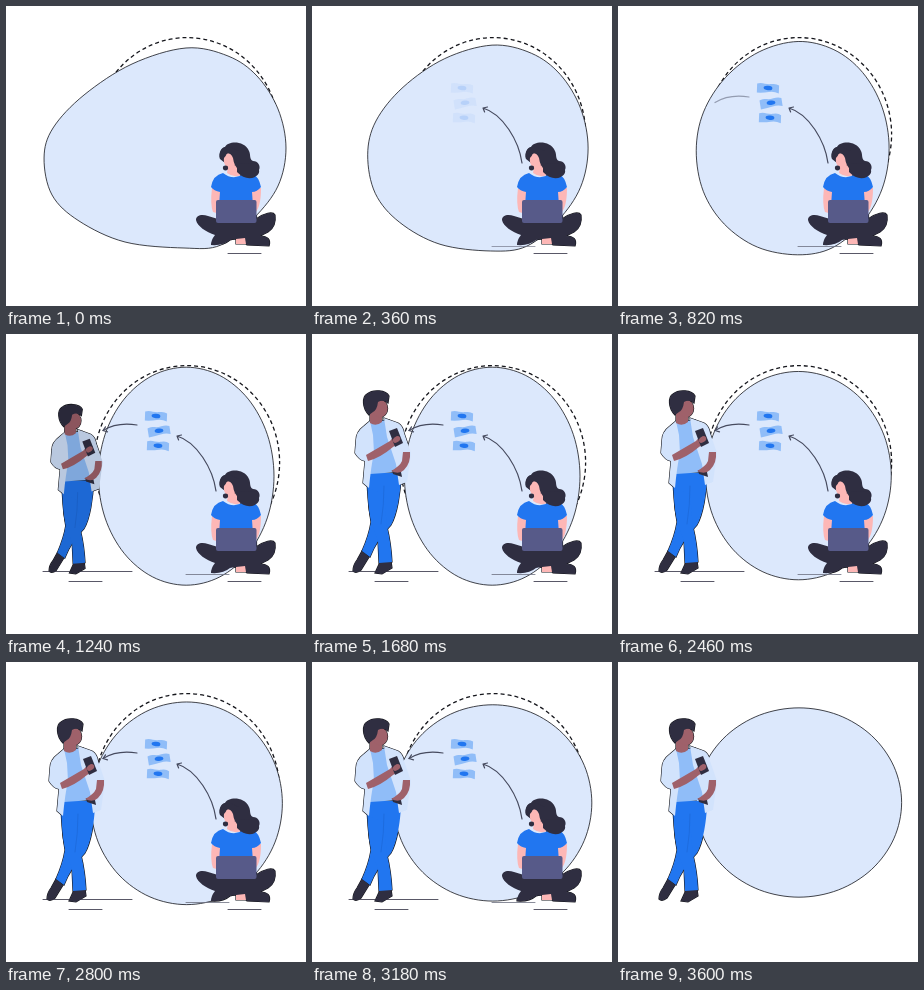
An HTML page with a canvas that plays this animation: 300 px wide and 300 px high, repeating every 3620 ms.

```html
<!DOCTYPE html>
<html lang="en">
<head>
<meta charset="utf-8">
<title>Sending money</title>
<style>
  html, body { margin: 0; width: 100%; height: 100%; overflow: hidden; background: #fff; }
  canvas { display: block; width: 300px; height: 300px; }
</style>
</head>
<body>
<canvas id="stage"></canvas>
<script>
const LOOP = 3620;
const INK = '#2f2e41', LINE = '#464a5e', EDGE = '#15161c', BLUE = '#2176f0', SKY = '#90bdf8';
const SKIN = '#fdb7b6', BROWN = '#9f616a', COAT = '#d2e3fc', FIELD = '#dce8fc';

const canvas = document.getElementById('stage');
const ctx = canvas.getContext('2d');
const ratio = window.devicePixelRatio || 1;
canvas.width = canvas.height = 300 * ratio;

let rimOnly = false; // when set, shapes draw only their dark rim

const clamp = v => Math.max(0, Math.min(1, v));
const progress = (t, from, to) => clamp((t - from) / (to - from));

function paint(color, path) {
  if (rimOnly) {
    ctx.strokeStyle = EDGE;
    ctx.lineWidth = 1.2;
    ctx.stroke(path);
  } else {
    ctx.fillStyle = color;
    ctx.fill(path);
  }
}

const fill = (color, d) => paint(color, new Path2D(d));

function oval(color, x, y, rx, ry, turn = 0) {
  const path = new Path2D();
  path.ellipse(x, y, rx, ry, turn, 0, Math.PI * 2);
  paint(color, path);
}

function stroke(color, width, d) {
  ctx.strokeStyle = color;
  ctx.lineWidth = width;
  ctx.lineCap = ctx.lineJoin = 'round';
  ctx.stroke(new Path2D(d));
}

function layer(alpha, draw) {
  if (alpha <= 0) return;
  ctx.save();
  ctx.globalAlpha = alpha;
  draw();
  ctx.restore();
}

function rim(draw) {
  rimOnly = true;
  draw();
  rimOnly = false;
}

// Field outlines, all clockwise from the rightmost point
const pebble = [
  [280, 142], [272, 180], [248, 212], [215, 239], [178, 242], [119, 236], [73, 215], [46, 189],
  [38, 152], [47, 122], [78, 89], [126, 58], [180, 42], [222, 50], [251, 70], [272, 103]
];
const ring = (cx, cy, rx, ry) => pebble.map((_, i) => {
  const a = i * Math.PI * 2 / pebble.length;
  return [cx + rx * Math.cos(a), cy + ry * Math.sin(a)];
});
const tall = ring(180.2, 142.2, 87.8, 109);
const wide = ring(181, 140.5, 102.8, 94.5);
const mix = (a, b, u) => a.map(([x, y], i) => [x + (b[i][0] - x) * u, y + (b[i][1] - y) * u]);

function drawField(t) {
  const pts = t < 1110
    ? mix(pebble, tall, t / 1110)
    : mix(tall, wide, progress(t, 1880, LOOP));
  const at = i => pts[(i + pts.length) % pts.length];
  ctx.beginPath();
  ctx.moveTo(...pts[0]);
  pts.forEach((p, i) => {
    const before = at(i - 1), next = at(i + 1), after = at(i + 2);
    ctx.bezierCurveTo(
      p[0] + (next[0] - before[0]) / 6, p[1] + (next[1] - before[1]) / 6,
      next[0] - (after[0] - p[0]) / 6, next[1] - (after[1] - p[1]) / 6,
      next[0], next[1]);
  });
  ctx.closePath();
  ctx.fillStyle = FIELD;
  ctx.fill();
  ctx.strokeStyle = EDGE;
  ctx.lineWidth = 0.8;
  ctx.stroke();
}

function drawDashes(t) {
  ctx.strokeStyle = EDGE;
  ctx.lineWidth = 1.3;
  ctx.lineCap = 'butt';
  ctx.setLineDash([4, 3]);
  ctx.lineDashOffset = -t / LOOP * 14;
  ctx.beginPath();
  ctx.ellipse(181, 128.4, 92.6, 96.8, 0, 0, Math.PI * 2);
  ctx.stroke();
}

function drawNote(x, y, turn) {
  ctx.save();
  ctx.translate(x, y);
  ctx.rotate(turn);
  fill(SKY, 'M-11-4C-6-6-2-3 3-4Q8-5 11-3L11 5Q6 3 1 4T-11 5Z');
  oval(BLUE, 0, 0, 4.4, 2.2, 0.05);
  ctx.restore();
}

function drawMoney() {
  drawNote(150, 82, 0.04);
  drawNote(153, 96.8, -0.16);
  drawNote(152, 111.7, 0.04);
}

const drawRightArrow = () =>
  stroke(LINE, 1.2, 'M210 157C207 135 191 108 171 102M175.5 101L171 102L172.6 106');

function drawWoman() {
  // Hair behind, then neck, arms and shirt
  fill(INK, 'M214 153C212 146 216 141 219 141C222 135 238 134 243 145C245 149 243 153 247 155C252 155 255 160 253 164C254 168 250 170 249 171C243 175 234 171 229 165Z');
  fill(SKIN, 'M222 160L231 159Q231 167 236 168Q229 173 221 167Z');
  fill(SKIN, 'M206 182Q204 198 207 206L214 208L215 183ZM244 182L255 182Q255 201 249 207L243 204Z');
  fill(BLUE, 'M217 167Q227 175 238 168L247 168Q253 171 255 181Q251 186 246 186L247 200L213 200L214 186Q208 185 205 181Q207 169 217 167Z');
  fill(INK, 'M231 158L250 157C255 160 252 167 249 171Q240 175 231 166Z');
  oval(SKIN, 223.5, 155, 5.6, 7.8, -0.25);
  fill(INK, 'M214 153C212 145 218 139 224 141L233 145L233 164Q228 160 227 152Q225 147 221 147Q219 153 214 153Z');
  oval(INK, 219.5, 162, 2.6, 2.4);

  // Crossed legs and laptop
  fill(INK, 'M190 214C190 209 196 208 202 210L212 213L250 213C258 207 267 205 269 209C270 216 268 222 262 226L254 230C262 230 265 234 263 240L241 239C238 234 230 232 224 234Q217 240 205 239Q205 234 209 229C200 226 191 220 190 214Z');
  fill(SKIN, 'M230 233L239 232L240 238L230 238Z');
  const laptop = new Path2D();
  laptop.roundRect(210, 194, 40.5, 23, 2);
  paint('#575a89', laptop);
}

function drawMan() {
  // Shoes and crossed legs
  fill(INK, 'M50 217L57 223L49 236Q44 240 41 237Q41 231 45 226ZM68 228L79 227L80 234L70 240L63 239Z');
  fill(BLUE, 'M55 139L89 139C89 158 85 181 79 191Q65 205 58 223L50 217Q57 201 59 188Q55 165 55 139Z');
  fill(BLUE, 'M57 154C55 176 60 191 66 207L67 229L80 228Q79 209 75 193L72 160Z');
  if (!rimOnly) stroke('#1c67d7', 0.7, 'M72 152Q72 172 69 190');

  // Shirt, open coat and arms
  fill(SKY, 'M58 88L77 86L87 138L58 140Z');
  fill(COAT, 'M58 87L52 92Q44 98 44 106L43 119Q47 126 53 127L51 149L57 154Q59 132 62 119L61 101Z');
  fill(COAT, 'M72 84L86 89Q91 92 92 99L99 119L95 148L87 151L84 130L75 103Z');
  fill(BROWN, 'M54 121Q66 114 78 107L83 101L88 102Q88 109 81 113Q68 124 56 127Z');
  fill(INK, 'M77 97L85 94L91 109L83 113Z');
  oval(BROWN, 84.5, 105.5, 4, 2.8, -0.6);
  fill(INK, 'M80 136L89 138L90 143L81 140Z');
  fill(BROWN, 'M91 118L98 118Q99 129 92 136Q87 141 79 137Q88 132 90 127Z');

  // Head
  fill(BROWN, 'M58 75L70 79L70 88Q64 93 58 89Z');
  oval(BROWN, 68, 74.5, 7.6, 8.8);
  fill(INK, 'M57 81C50 74 50 63 55 60C61 55 74 56 77 62L76 69Q71 65 66 68Q65 76 61 78Z');
}

// The man grows from his feet and brightens out of the dark
function drawManPopping(t) {
  const u = progress(t, 940, 1280);
  if (u < 0.5) return;
  const size = 0.35 + 0.65 * u;
  ctx.save();
  ctx.translate(68, 239);
  ctx.scale(size, size);
  ctx.translate(-68, -239);
  if (u < 1) ctx.filter = `brightness(${u})`;
  drawMan();
  ctx.restore();
}

function render(t) {
  const stay = 1 - progress(t, 3280, 3520);
  ctx.setTransform(ratio, 0, 0, ratio, 0, 0);
  ctx.fillStyle = '#fff';
  ctx.fillRect(0, 0, 300, 300);

  // Rims go below the field, so they show only against white
  layer(stay, () => drawDashes(t));
  layer(stay, () => rim(drawWoman));
  rim(() => drawManPopping(t));
  drawField(t);

  layer(stay, () => stroke(INK, 0.8, 'M222 247.5H255'));
  layer(stay * progress(t, 120, 420), () => stroke('#6c7080', 0.8, 'M180 240.5H223'));
  layer(stay * progress(t, 840, 1060), () => stroke(INK, 0.8, 'M37 237.5H126M63 247.5H96'));
  layer(stay * progress(t, 60, 340), drawRightArrow);
  layer(stay * progress(t, 310, 660), drawMoney);
  layer(stay * progress(t, 700, 950), () => stroke(LINE, 1.2, 'M131 91C119 89 106 91 97 96.5'));
  layer(stay * progress(t, 860, 1000), () => stroke(LINE, 1.2, 'M99.5 92.8L97 96.5L101.5 97.8'));
  layer(stay, drawWoman);
  drawManPopping(t);
}

const start = performance.now();
function tick() {
  render((performance.now() - start) % LOOP);
  requestAnimationFrame(tick);
}
tick();
</script>
</body>
</html>
```
